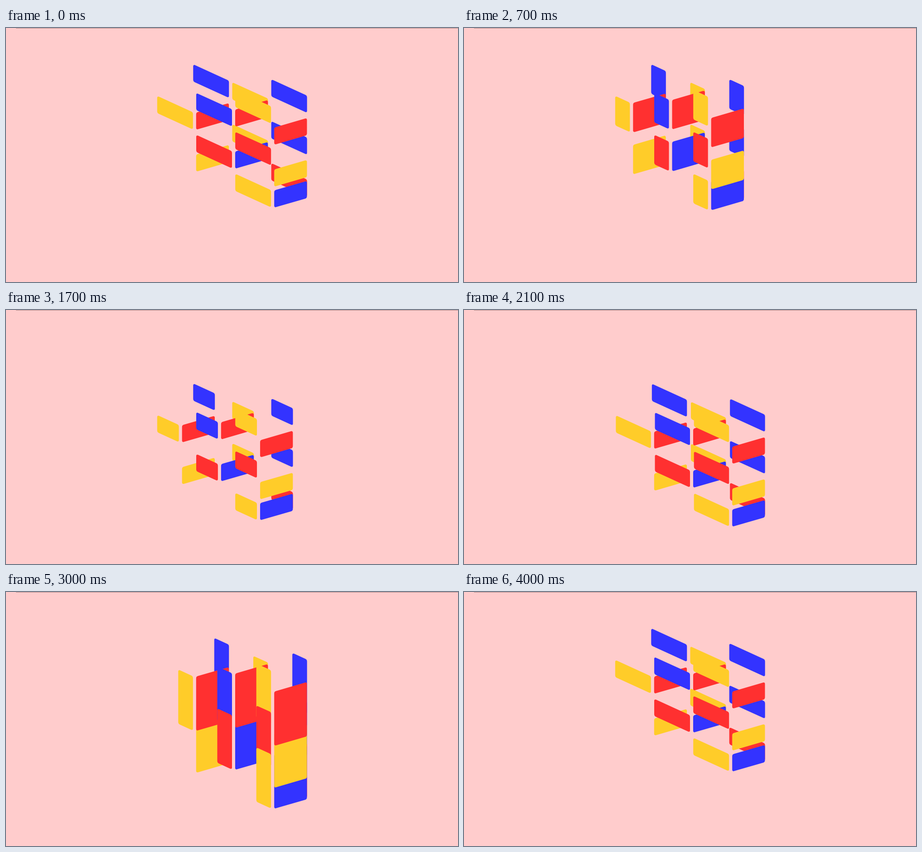
An HTML page with a canvas for the animation above (4.1 s loop, 998x561 px).

```html
<!DOCTYPE html>
<html lang="en">
<head>
<meta charset="utf-8">
<title>Panels</title>
<style>
  html, body { margin: 0; width: 100%; height: 100%; overflow: hidden; background: #ffcccc; }
  canvas { display: block; }
</style>
</head>
<body>
<canvas id="stage" width="998" height="561"></canvas>
<script>
const ctx = document.getElementById('stage').getContext('2d');

const BG = '#ffcccc', RULE = '#b48a86';
const RED = '#ff3030', YELLOW = '#ffcc29', BLUE = '#3333ff';

const LOOP = 4100, TICK = 100, STEP = 500;
const COL = { x: 86.2, y: -6.6 }, HALF_ROW = 46.3;
const DEPTH_SLOPE = 0.456, SIDE_SLOPE = -0.29;
const DEPTH_WIDTH = 79, SIDE_WIDTH = 72.3, HEIGHT = 38, RADIUS = 4;
const SQUEEZE = 46.5, DROP = 82;

// Each layer lists its panels as [column, half row, colour], back to front.
const layers = [
  { x: 413.3, y: 80.2, depth: true, panels: [
    [0, 0, BLUE], [1, 1, YELLOW], [1, 3, YELLOW],
    [2, 1, BLUE], [2, 3, BLUE], [2, 5, RED]] },
  { x: 419.8, y: 186.7, depth: false, panels: [
    [0, 2, YELLOW], [0, 0, RED], [1, 2, BLUE], [1, 0, RED],
    [2, 4, BLUE], [2, 3, YELLOW], [2, 1, RED]] },
  { x: 333.8, y: 150, depth: true, panels: [
    [0, 0, YELLOW], [1, 0, BLUE], [1, 2, RED],
    [2, 0, YELLOW], [2, 2, RED], [2, 4, YELLOW]] }
];

// Cubic bezier (0.77, 0, 0.024, 1), solved by bisection.
function ease(x) {
  if (x <= 0) return 0;
  if (x >= 1) return 1;
  let lo = 0, hi = 1, u;
  for (let i = 0; i < 24; i++) {
    u = (lo + hi) / 2;
    const v = 1 - u;
    if (3 * u * v * v * 0.77 + 3 * u * u * v * 0.024 + u * u * u < x) lo = u;
    else hi = u;
  }
  return u * u * (3 - 2 * u);
}

// The four edges take turns moving, one every half second.
function edgesAt(t) {
  const move = n => ease((t - n * STEP) / STEP);
  return {
    right: SQUEEZE * (move(3) - move(0)),
    bottom: DROP * (move(1) - move(6)),
    top: DROP * (move(2) - move(5)),
    left: SQUEEZE * (move(4) - move(7))
  };
}

function drawPanel(x, y, width, height, slope, color) {
  ctx.setTransform(1, slope, 0, 1, x, y);
  ctx.fillStyle = color;
  ctx.beginPath();
  ctx.roundRect(0, 0, width, height, RADIUS);
  ctx.fill();
}

function draw(t) {
  const { left, right, top, bottom } = edgesAt(t);
  ctx.setTransform(1, 0, 0, 1, 0, 0);
  ctx.fillStyle = BG;
  ctx.fillRect(0, 0, 998, 561);
  ctx.fillStyle = RULE;
  ctx.fillRect(22, 0, 976, 1);

  for (const { x, y, depth, panels } of layers) {
    const shift = depth ? left : right;
    const width = depth ? DEPTH_WIDTH + right - left : SIDE_WIDTH;
    const slope = depth ? DEPTH_SLOPE : SIDE_SLOPE;
    for (const [col, row, color] of panels) {
      drawPanel(
        x + col * COL.x + shift,
        y + col * COL.y + row * HALF_ROW + shift * DEPTH_SLOPE + top,
        width, HEIGHT + bottom - top, slope, color);
    }
  }
}

const start = performance.now();
function frame() {
  const t = (performance.now() - start) % LOOP;
  draw(Math.floor(t / TICK) * TICK);
  requestAnimationFrame(frame);
}
frame();
</script>
</body>
</html>
```
